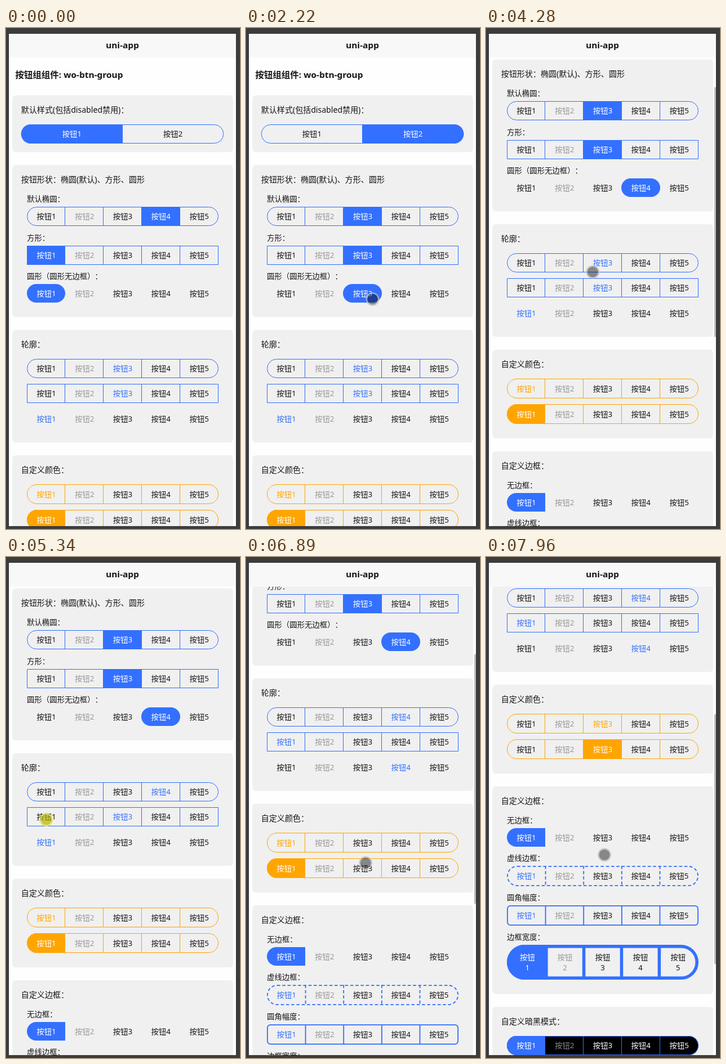
An HTML page for the animation above (8 s loop, 403 by 863 pixels).

```html
<!DOCTYPE html>
<html lang="zh-CN">
<head>
<meta charset="utf-8">
<title>wo-btn-group</title>
<style>
  html, body { margin: 0; width: 100%; height: 100%; overflow: hidden; background: #3c3c3c; }
  svg { display: block; width: 403px; height: 863px; }
  text {
    font: 13px "Noto Sans", "Noto Sans CJK SC", "Noto Sans CJK", sans-serif;
    text-spacing-trim: space-all;
    fill: #151515;
  }
  .title { font-size: 13.65px; }
  .head { font-size: 15px; font-weight: 700; }
  .mid { text-anchor: middle; }
  .card { fill: #f0f0f0; }
  #dot { fill: rgba(0, 0, 0, .44); }
  #ring { fill: none; stroke: rgba(190, 185, 190, .75); stroke-width: 2.4; }
  .pressed #dot { fill: rgba(180, 180, 0, .7); }
  .pressed #ring { stroke: rgba(225, 225, 100, .8); }
</style>
</head>
<body>
<svg viewBox="0 0 403 863">
  <clipPath id="screen"><rect x="5" y="10" width="391" height="848"/></clipPath>
  <rect width="403" height="863" fill="#3c3c3c"/>
  <g clip-path="url(#screen)">
    <rect x="5" y="10" width="391" height="848" fill="#fefefe"/>
    <g id="page"></g>
    <rect x="5" y="10" width="391" height="41" fill="#f8f8f8"/>
    <text class="head mid" x="200.5" y="35">uni-app</text>
    <rect id="thumb" x="393" width="3" height="430" fill="#bdbdbd"/>
  </g>
  <g id="cursor"><circle id="dot" r="9.5"/><circle id="ring" r="10.3"/></g>
</svg>
<script>
const LOOP = 8000, BLUE = '#3370ff', ORANGE = '#ffa500';
const $ = id => document.getElementById(id);
const page = $('page');
const ease = u => { u = Math.min(Math.max(u, 0), 1); return u * u * (3 - 2 * u); };

// ---- Layout: cards and rows flow down the page ----

let flowY = 116;
const groups = [];

function add(tag, attrs, content) {
  const el = document.createElementNS('http://www.w3.org/2000/svg', tag);
  for (const key in attrs) el.setAttribute(key, attrs[key]);
  if (content) el.textContent = content;
  return page.appendChild(el);
}

const label = (x, cy, content, cls = '') =>
  add('text', { x, y: Math.round(cy) + 5, class: cls }, content);

// Box with separate corner radii for its left and right sides.
function boxPath(x, y, w, h, l, r) {
  const arc = (rad, dx, dy) => `a${rad} ${rad} 0 0 1 ${dx} ${dy}`;
  return `M${x + l} ${y}H${x + w - r}${arc(r, r, r)}V${y + h - r}${arc(r, -r, r)}` +
    `H${x + l}${arc(l, -l, -l)}V${y + l}${arc(l, l, -l)}Z`;
}

// rows: [caption, options] pairs
function card(title, rows, pad = 25.1) {
  const top = flowY, captioned = rows[0][0];
  const back = add('rect', { x: 11, y: Math.round(top), width: 380, rx: 6, class: 'card' });
  label(26, top + 25, title, 'title');
  flowY += captioned ? 39 : 50;
  rows.forEach(([caption, options], i) => {
    if (caption) {
      label(36, flowY + 19.2, caption);
      flowY += 33.1;
    } else if (i) flowY += 10.4;
    group(options);
  });
  back.setAttribute('height', Math.round(flowY + pad) - Math.round(top));
  flowY += pad + 21.5;
}

function group(options) {
  const o = { x: 36, w: 330, n: 5, border: 1, color: BLUE, filled: true, active: 0,
    ink: '#151515', off: '#999', h: options.bare ? 32 : 33.4, ...options };
  const { x, w, n, border: b, color } = o;
  const y = Math.round(flowY), h = Math.round(o.h), r = o.r ?? h / 2;
  flowY += o.h;

  // Neighbouring buttons share one border width.
  const pitch = (w - b) / n;
  const left = i => b === 1 ? Math.floor(x + pitch * i) : x + pitch * i;
  const centre = i => x + b / 2 + pitch * (i + .5);
  const indices = [...Array(n).keys()];
  if (o.back) add('path', { d: boxPath(x, y, w, h, r, r), fill: o.back });

  const fills = indices.map(i => add('path', {
    d: boxPath(left(i), y, left(i + 1) + b - left(i), h,
      o.pill || i === 0 ? r : 0, o.pill || i === n - 1 ? r : 0),
    fill: color
  }));
  if (!o.bare) {
    const line = { fill: 'none', stroke: color, 'stroke-width': b,
      'stroke-dasharray': o.dashed ? `${3 * b} ${2 * b}` : 'none' };
    const inner = Math.max(r - b / 2, 0);
    add('path', { ...line, d: boxPath(x + b / 2, y + b / 2, w - b, h - b, inner, inner) });
    indices.slice(1).forEach(i => add('path', { ...line, d: `M${left(i) + b / 2} ${y}v${h}` }));
  }
  const texts = indices.map(i => o.wrap
    ? [label(centre(i), y + h / 2 - 9, '按钮', 'mid'), label(centre(i), y + h / 2 + 9, `${i + 1}`, 'mid')]
    : [label(centre(i), Math.floor(y + h / 2), `按钮${i + 1}`, 'mid')]);

  groups.push({
    taps: [],
    spot: i => [centre(i), y + h / 2 + 5],
    update(t) {
      const tap = this.taps.filter(p => p.time <= t).pop();
      const active = tap ? tap.index : o.active;
      if (active === this.shown) return;
      this.shown = active;
      indices.forEach(i => {
        const on = i === active;
        fills[i].style.display = on && o.filled ? '' : 'none';
        const ink = on ? (o.filled ? '#fff' : color) : i === 1 && n > 2 ? o.off : o.ink;
        texts[i].forEach(el => el.style.fill = ink);
      });
    }
  });
}

const outline = { filled: false }, bare = { bare: true };
label(16, 81, '按钮组组件: wo-btn-group', 'head');

card('默认样式(包括disabled禁用)：', [['', { x: 26, w: 349, n: 2 }]], 15);
card('按钮形状：椭圆(默认)、方形、圆形', [
  ['默认椭圆：', { active: 3 }],
  ['方形：', { r: 0 }],
  ['圆形（圆形无边框）：', { ...bare, pill: true }]
]);
card('轮廓：', [
  ['', { ...outline, active: 2 }],
  ['', { ...outline, active: 2, r: 0 }],
  ['', { ...outline, ...bare }]
]);
card('自定义颜色：', [
  ['', { ...outline, color: ORANGE, h: 34 }],
  ['', { color: ORANGE, h: 34 }]
]);
card('自定义边框：', [
  ['无边框：', bare],
  ['虚线边框：', { ...outline, border: 1.8, h: 35, dashed: true }],
  ['圆角幅度：', { ...outline, border: 1.8, h: 35, r: 6 }],
  ['边框宽度：', { border: 5.4, h: 60, wrap: true }]
]);
card('自定义暗黑模式：', [['', { back: '#000', ink: '#fff', off: '#888' }]]);

// ---- Gestures: pointer path, selections and scrolling all follow from these ----

const path = [], taps = [], drags = [];
let scrolled = 0;

const hover = (time, x, y) => path.push({ time, x, y });

function tap(time, groupIndex, index) {
  const target = groups[groupIndex], [x, y] = target.spot(index);
  hover(time - 80, x, y - scrolled);
  hover(time + 70, x, y - scrolled);
  target.taps.push({ time: time + 30, index });
  taps.push(time);
}

// Pulls the page up by distance; the pointer ends at x, y.
function drag(from, to, x, y, distance) {
  hover(from, x, y + distance);
  hover(to, x, y);
  drags.push({ from, to, distance });
  scrolled += distance;
}

hover(130, 230, 665);
tap(740, 0, 1);
tap(1240, 1, 2);
tap(1840, 2, 2);
tap(2090, 3, 2);
hover(2220, 218, 467);
tap(2960, 3, 4);
tap(3560, 3, 3);
drag(3860, 4210, 177, 421, 182);
tap(4710, 4, 3);
tap(5370, 5, 0);
tap(6070, 6, 3);
hover(6500, 297, 499);
drag(6730, 6890, 206, 527, 129);
tap(7050, 8, 2);
tap(7350, 7, 2);
drag(7600, 7960, 204, 513, 205);

function pointerAt(t) {
  const next = path.findIndex(p => p.time > t);
  if (next < 1) return next ? path[path.length - 1] : path[0];
  const a = path[next - 1], b = path[next], u = ease((t - a.time) / (b.time - a.time));
  return { x: a.x + (b.x - a.x) * u, y: a.y + (b.y - a.y) * u };
}

const scrollAt = t => drags.reduce(
  (sum, d) => sum + d.distance * ease((t - d.from) / (d.to - d.from)), 0);

function render(t) {
  const scroll = Math.round(scrollAt(t)), pointer = pointerAt(t);
  page.setAttribute('transform', `translate(0 ${-scroll})`);
  $('thumb').setAttribute('y', 10 + scroll * .506);
  $('thumb').style.display = drags.some(d => t > d.from && t < d.to + 200) ? '' : 'none';
  groups.forEach(g => g.update(t));
  $('cursor').setAttribute('transform', `translate(${pointer.x} ${pointer.y})`);
  $('cursor').style.display = t < path[0].time ? 'none' : '';
  $('cursor').classList.toggle('pressed', taps.some(time => Math.abs(t - time) < 60));
}

const start = performance.now();
function tick() {
  render((performance.now() - start) % LOOP);
  requestAnimationFrame(tick);
}
tick();
</script>
</body>
</html>
```
